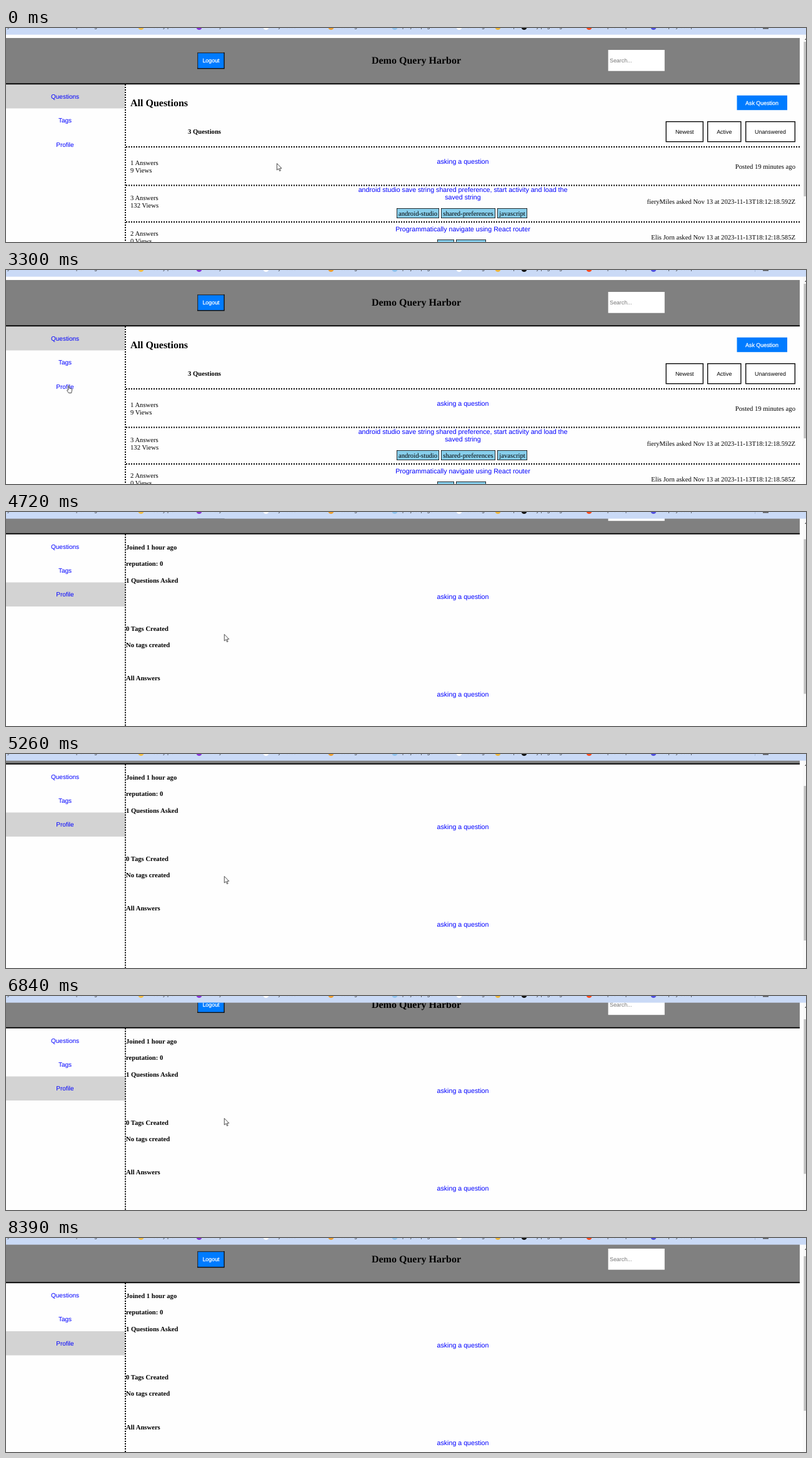
An HTML page for the animation above (9530 ms loop, 1280x342 px).

```html
<!DOCTYPE html>
<html lang="en">
<head>
<meta charset="utf-8">
<title>Question board</title>
<style>
  html, body { margin: 0; width: 100%; height: 100%; overflow: hidden; background: #fefefe; }
  svg { display: block; }
  text { font: 10.67px "Liberation Serif", "Times New Roman", serif; white-space: pre; text-rendering: geometricPrecision; }
  .bold { font-weight: bold; }
  .head { font-weight: bold; font-size: 16px; }
  .link, .nav, .btn, .mark { font-family: "Liberation Sans", Arial, sans-serif; }
  .link, .nav { fill: #00f; }
  .nav { font-size: 10px; }
  .btn { font-size: 8.89px; }
  .mark { font-size: 9px; fill: #333; }
  .hint { fill: #757575; }
  .white { fill: #fff; stroke: #fff; stroke-width: .25; }
  .dots { stroke: #000; stroke-width: 2; stroke-dasharray: 2 2; }
</style>
</head>
<body>
<svg id="stage" width="1280" height="342" viewBox="0 0 1280 342"></svg>
<script>
const LOOP = 9530, PROFILE_AT = 3580;

const rect = (x, y, w, h, fill, extra = '') =>
  `<rect x="${x}" y="${y}" width="${w}" height="${h}" fill="${fill}" ${extra}/>`;
const text = (x, y, s, cls = '', anchor = 'start') =>
  `<text x="${x}" y="${y}" class="${cls}" text-anchor="${anchor}">${s}</text>`;
const dots = (x1, y1, x2, y2) =>
  `<line class="dots" x1="${x1}" y1="${y1}" x2="${x2}" y2="${y2}"/>`;
const link = (y, s) => text(731, y, s, 'link', 'middle');
const tag = (x, w, y, s) =>
  rect(x + .4, y + .4, w - .8, 15.2, '#87ceeb', 'stroke="#000" stroke-width=".8"') +
  text(x + w / 2, y + 12, s, '', 'middle');
const outlined = (x, w, s) =>
  rect(x + .67, 149.67, w - 1.33, 32, '#fff', 'stroke="#000" stroke-width="1.33"') +
  text(x + w / 2, 168.6, s, 'btn', 'middle');
const row = (y, answers, views, by) =>
  text(199, y - 6, answers + ' Answers') + text(199, y + 6, views + ' Views') + text(1263, y, by, '', 'end');

const header =
  rect(0, 16, 1270, 72.3, '#808080') + rect(0, 88.2, 1270, 2, '#000') +
  rect(306, 39, 43.7, 26.4, '#000') + rect(306, 39, 42.4, 25.1, '#333') +
  rect(307.3, 40.3, 41.1, 23.8, '#007bff') +
  text(328, 55.3, 'Logout', 'btn white', 'middle') +
  text(656.5, 57.3, 'Demo Query Harbor', 'head', 'middle') +
  rect(963.5, 35, 90.3, 33.7, '#fff') + text(966, 55.2, 'Search...', 'btn hint');

const sidebar =
  ['Questions', 'Tags', 'Profile'].map((s, i) => text(94.5, 113 + i * 38.4, s, 'nav', 'middle')).join('') +
  dots(191, 90, 191, 430);

const questions =
  text(199, 124.8, 'All Questions', 'head') +
  rect(1169.5, 107.8, 80.5, 23.4, '#007bff') + text(1209.5, 122.8, 'Ask Question', 'btn white', 'middle') +
  text(291, 169, '3 Questions', 'bold') +
  outlined(1055.5, 60.5, 'Newest') + outlined(1122, 54.5, 'Active') + outlined(1183, 80, 'Unanswered') +
  [190, 251.5, 310].map(y => dots(192, y, 1270, y)).join('') +
  row(224.5, 1, 9, 'Posted 19 minutes ago') +
  link(217.3, 'asking a question') +
  row(281, 3, 132, 'fieryMiles asked Nov 13 at 2023-11-13T18:12:18.592Z') +
  link(261.8, 'android studio save string shared preference, start activity and load the') +
  link(274, 'saved string') +
  tag(625, 68, 288, 'android-studio') + tag(696, 87, 288, 'shared-preferences') + tag(786, 48, 288, 'javascript') +
  row(337.6, 2, 0, 'Elis Jorn asked Nov 13 at 2023-11-13T18:12:18.585Z') +
  link(324.6, 'Programmatically navigate using React router') +
  tag(690, 27, 338, 'react') + tag(720, 48, 338, 'javascript');

const profile =
  [[114, 'Joined 1 hour ago'], [140.3, 'reputation: 0'], [167, '1 Questions Asked'], [244, '0 Tags Created'],
   [270.4, 'No tags created'], [323.5, 'All Answers']].map(([y, s]) => text(192, y, s, 'bold')).join('') +
  link(193, 'asking a question') + link(349.2, 'asking a question');

// Browser bookmarks, cut off by the top edge
const marks = [[216, '#f5bf45', 'weekly plan'], [309, '#8a35d8', 'library'], [416, '#fff', 'my notes'],
  [520, '#f0a030', 'reading'], [622, '#8fc4ee', 'project page'], [725, '#fff', 'catalog'], [787, '#f0b83c', 'maps'],
  [829, '#111', 'my page log'], [933, '#ff4a1c', 'campus help'], [1036, '#5050e0', 'display setup']];
const toolbar =
  rect(0, 0, 1280, 10.67, '#cadaf6') + text(2, 0, 'y', 'mark') + text(112, 0, 'planning', 'mark') +
  marks.map(([x, fill, s]) =>
    `<circle cx="${x}" cy="-1.5" r="4.5" fill="${fill}"/>` + text(x + 12, 0, s, 'mark')).join('') +
  rect(1198, 0, 1, 3, '#a9bbdc') + rect(1211, 0, 9, 1.5, '#555');

stage.innerHTML =
  `<g id="page">${rect(0, 90, 190, 38.5, '#d3d3d3', 'id="active"')}${header}${sidebar}
    <g id="list">${questions}</g><g id="user">${profile}</g></g>
  ${rect(1275, 11, 5, 331, '#f9f9f9')}<path d="M1278 19l2-2.5v2.5z" fill="#505050"/>
  ${rect(1276.5, 22, 3.5, 247, '#c1c1c1', 'id="thumb"')}
  ${toolbar}
  <g id="cursor" fill="#fff" stroke="#222" stroke-width=".8" stroke-linejoin="round">
    <path id="arrow" d="M.5 .5V11L3 8.8 4.8 12.6 6.4 11.9 4.7 8.2H8z"/>
    <path id="hand" d="M2.5 7V1.4Q3.3 0 4.1 1.4V5L8 5.8Q8.8 6.2 8.6 8L7.6 12.5H3.3L.6 8.6Q.5 7 2.5 8z"/>
  </g>`;

// [time, x, y, over a link]
const moves = [[0, 433, 216], [2520, 329.5, 176.5], [2640, 245, 184], [2760, 202, 192], [2910, 122, 188],
  [3030, 100, 184, 1], [3180, 98, 184, 1], [3300, 97, 184, 1], [3870, 140, 192], [3990, 235, 200],
  [4110, 325, 198], [4230, 348.8, 195], [7870, 820, 275], [7990, 1138, 270], [8240, 1213, 324], [8390, -50, 0]];
// [time, scroll offset]
const scrolls = [[0, 0], [4600, 21], [4720, 54.5], [4850, 65.5], [4970, 69.5], [5260, 73.5], [6600, 70],
  [6720, 56], [6840, 38.5], [6960, 27], [7110, 22], [7230, 20], [7380, 19], [7500, 18]];

const latest = (steps, t) => steps.findLast(s => s[0] <= t);
const show = (el, on) => el.setAttribute('display', on ? 'inline' : 'none');
const shift = (el, x, y) => el.setAttribute('transform', `translate(${x} ${y})`);

function draw(now) {
  const t = now % LOOP, onProfile = t >= PROFILE_AT;
  const [, x, y, overLink] = latest(moves, t);
  const [, offset] = latest(scrolls, t);
  show(list, !onProfile);
  show(user, onProfile);
  show(arrow, !overLink);
  show(hand, overLink);
  active.setAttribute('y', onProfile ? 167 : 90);
  shift(page, 0, -offset);
  shift(thumb, 0, offset * .395);
  shift(cursor, x, y);
  requestAnimationFrame(() => draw(performance.now()));
}
draw(0);
</script>
</body>
</html>
```
